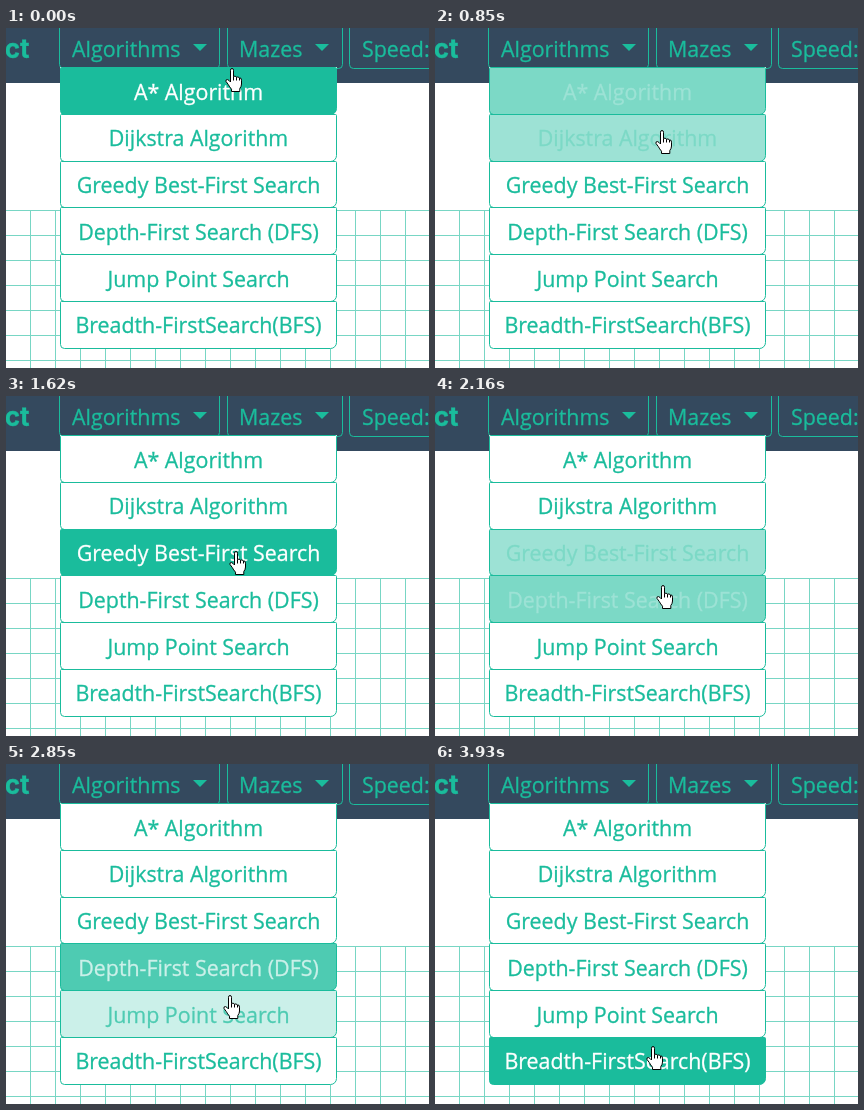
These frames come from a looping animation (423x340 px, 4230 ms). An HTML page with a canvas:

```html
<!DOCTYPE html>
<html lang="en">
<head>
<meta charset="utf-8">
<title>Algorithm menu</title>
<style>
  html, body { margin: 0; width: 100%; height: 100%; overflow: hidden; background: #fff; }
  canvas { display: block; }
</style>
</head>
<body>
<canvas id="stage" width="423" height="340"></canvas>
<script>
const ctx = document.getElementById('stage').getContext('2d');
const W = 423, H = 340;
const LOOP = 4230, STEP = LOOP / 55, LAST_STEP = 51, FADE = 150;
const TEAL = '#1abc9c', NAVY = '#34495e';
const FONT = '21.4px "Open Sans", "Noto Sans", sans-serif';

const MENU = { x: 54.5, y: 39.6, w: 276, rowH: 46.8 };
const ITEMS = ['A* Algorithm', 'Dijkstra Algorithm', 'Greedy Best-First Search',
  'Depth-First Search (DFS)', 'Jump Point Search', 'Breadth-FirstSearch(BFS)'];
// Step at which the pointer enters each row
const ENTER = [-10, 10.12, 18.4, 26.93, 36.4, 46.3];

// Pointer path: [step, x, y]
const PATH = [[0, 219, 40], [4, 219, 47], [5, 219, 47], [11, 220, 102], [12, 220, 109],
  [18, 222, 133], [21, 223, 155], [23, 223, 155], [28, 221, 189], [30, 220, 201],
  [32, 220, 201], [37, 217, 231], [40, 215, 240], [42, 215, 240], [49, 211, 278], [51, 211, 281.5]];

const HAND = new Path2D('M5.5 14V2.3Q5.5.5 7 .5T8.5 2.3V8.5Q10.2 7.4 11.5 9.2Q13 8.2 14.5 10' +
  'Q16.5 9.4 16.5 12.2V16Q16.5 18.5 14.8 20.5V23.5H6.5V21.2Q4.6 19 3.2 16.4L.9 13.3' +
  'Q.6 11.3 2.6 11.6Q4 12.2 5.5 14Z');
const KNUCKLES = new Path2D('M8.5 8.5V12.5M11.5 9.2V12.5M14.5 10V12.5');

const clamp = v => Math.min(1, Math.max(0, v));
const lerp = (a, b, u) => a + (b - a) * u;
const smooth = u => u * u * (3 - 2 * u);

// Blend from white (0) to teal (1)
const tint = u => `rgb(${lerp(255, 26, u)}, ${lerp(255, 188, u)}, ${lerp(255, 156, u)})`;

// Pixel-centred border between menu rows
const rowEdge = i => Math.floor(MENU.y + i * MENU.rowH) + 0.5;

function entered(row, step) {
  if (row >= ENTER.length) return 0;
  return smooth(clamp((step - ENTER[row]) * STEP / FADE));
}

function pointerAt(step) {
  const i = Math.max(1, PATH.findIndex(p => p[0] >= step));
  const [a, b] = [PATH[i - 1], PATH[i]];
  const u = (step - a[0]) / (b[0] - a[0]);
  return [Math.round(lerp(a[1], b[1], u)), Math.round(lerp(a[2], b[2], u))];
}

// A hairline stroke gives the text its slightly heavy rendering
function label(text, x, y, color, align = 'left', font = FONT) {
  ctx.font = font;
  ctx.textAlign = align;
  ctx.fillStyle = ctx.strokeStyle = color;
  ctx.lineWidth = 0.3;
  ctx.fillText(text, x, y);
  ctx.strokeText(text, x, y);
  ctx.lineWidth = 1;
}

function drawGrid() {
  ctx.strokeStyle = '#78d6c4';
  ctx.beginPath();
  for (let x = -0.5; x < W; x += 25) {
    ctx.moveTo(x, 182);
    ctx.lineTo(x, H);
  }
  for (let y = 182.5; y < H; y += 25) {
    ctx.moveTo(0, y);
    ctx.lineTo(W, y);
  }
  ctx.stroke();
}

function navButton(text, left, right, textX, caretX) {
  ctx.strokeStyle = TEAL;
  ctx.beginPath();
  ctx.roundRect(left, -10, right - left, 50.5, 4);
  ctx.stroke();
  label(text, textX, 29, TEAL);
  if (!caretX) return;
  ctx.beginPath();
  ctx.moveTo(caretX - 7, 16);
  ctx.lineTo(caretX + 7, 16);
  ctx.lineTo(caretX, 23);
  ctx.fill();
}

function drawHeader() {
  ctx.fillStyle = NAVY;
  ctx.fillRect(0, 0, W, 55);
  label('ct', 23.5, 30, TEAL, 'right', '700 26px Inter, sans-serif');
  navButton('Algorithms', 53.5, 213.5, 66, 194);
  navButton('Mazes', 221.5, 336.5, 233, 316);
  navButton('Speed:', 343.5, 460, 356);
}

function drawMenu(step) {
  ctx.fillStyle = '#fff';
  ctx.fillRect(MENU.x - 0.5, rowEdge(0) - 0.5, MENU.w + 1, rowEdge(6) - rowEdge(0) + 1);
  ITEMS.forEach((text, i) => {
    const top = rowEdge(i);
    const hover = entered(i, step) - entered(i + 1, step);
    ctx.beginPath();
    ctx.roundRect(MENU.x, top, MENU.w, rowEdge(i + 1) - top, [1, 1, 6, 4]);
    ctx.fillStyle = tint(hover);
    ctx.fill();
    ctx.strokeStyle = TEAL;
    ctx.stroke();
    const baseline = Math.round(71.7 + i * 46.75);
    label(text, MENU.x + MENU.w / 2, baseline, tint(1 - hover), 'center');
  });
}

function drawPointer(step) {
  const [x, y] = pointerAt(step);
  ctx.save();
  ctx.translate(x, y);
  ctx.fillStyle = '#fff';
  ctx.fill(HAND);
  ctx.strokeStyle = '#000';
  ctx.lineJoin = 'round';
  ctx.stroke(HAND);
  ctx.stroke(KNUCKLES);
  ctx.restore();
}

function draw(now) {
  // Motion advances in even steps and rests on the last one
  const step = Math.min(LAST_STEP, Math.floor((now % LOOP + 8) / STEP));
  ctx.lineWidth = 1;
  ctx.fillStyle = '#fff';
  ctx.fillRect(0, 0, W, H);
  drawGrid();
  drawHeader();
  drawMenu(step);
  drawPointer(step);
}

const start = performance.now();
function tick() {
  draw(performance.now() - start);
  requestAnimationFrame(tick);
}
tick();
</script>
</body>
</html>
```
